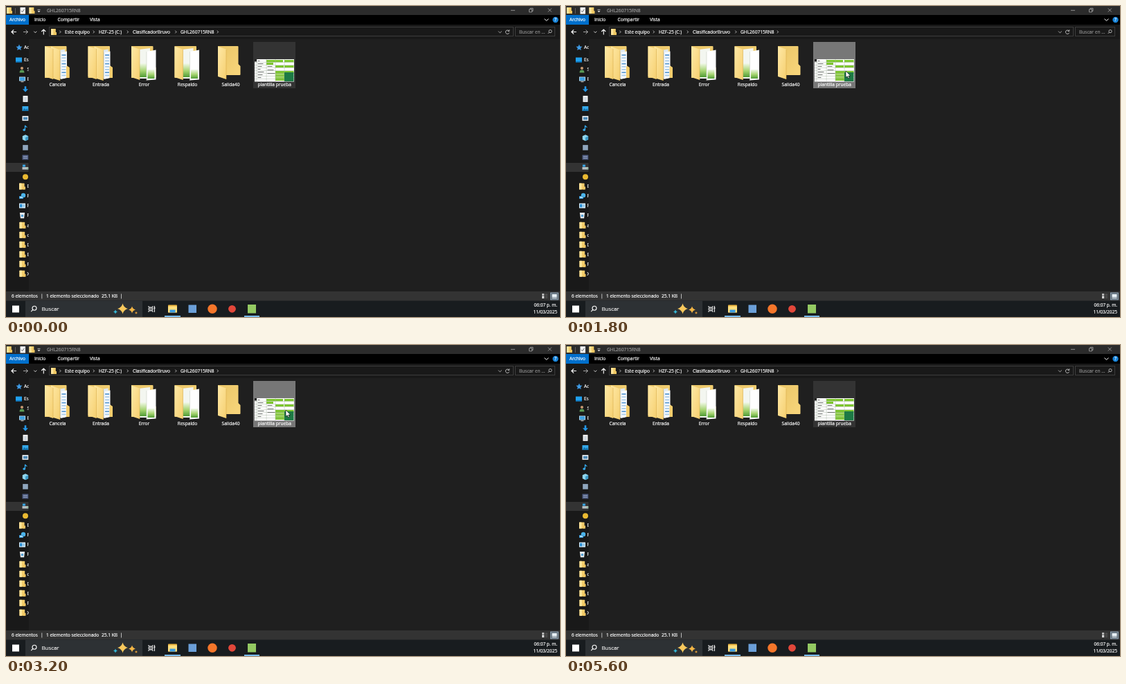
Write an HTML page that moves like this. It is 800 px wide and 450 px high and loops after 8000 ms.

```html
<!DOCTYPE html>
<html lang="es">
<head>
<meta charset="utf-8">
<title>Explorador</title>
<style>
html, body { margin: 0; width: 100%; height: 100%; overflow: hidden; background: #1f1f1f; }
svg { display: block; width: 100vw; height: 100vh; }
text { font: 6.6px "Open Sans", "Noto Sans", sans-serif; white-space: pre; stroke-width: .2; }
</style>
</head>
<body>
<svg id="stage" viewBox="0 0 800 450">
  <defs>
    <linearGradient id="flap" x2="1" y2="1"><stop stop-color="#ffe9a6"/><stop offset="1" stop-color="#f5cf70"/></linearGradient>
    <linearGradient id="back" y2="1"><stop stop-color="#eac566"/><stop offset="1" stop-color="#f8d67c"/></linearGradient>
    <linearGradient id="leaf" x2="0" y2="1"><stop stop-color="#f2f8ea"/><stop offset=".55" stop-color="#a5d46f"/><stop offset="1" stop-color="#4f9a35"/></linearGradient>
    <clipPath id="pane"><path d="M0 48H32.6V413H0z"/></clipPath>
  </defs>
</svg>
<script>
const LOOP = 8000, STEP = 200;
const NAME = "GHL260715RN8";
const stage = document.getElementById("stage");

const add = (parent, markup) => {
  const g = document.createElementNS("http://www.w3.org/2000/svg", "g");
  g.innerHTML = markup;
  return parent.appendChild(g);
};
const box = (x, y, w, h, fill, extra = "") =>
  `<rect x="${x}" y="${y}" width="${w}" height="${h}" fill="${fill}" ${extra}/>`;
const dot = (x, y, r, fill) => `<circle cx="${x}" cy="${y}" r="${r}" fill="${fill}"/>`;
const shape = (d, fill) => `<path d="${d}" fill="${fill}"/>`;
const line = (d, color, w = 1) => `<path d="${d}" fill="none" stroke="${color}" stroke-width="${w}"/>`;
// y is the middle of the line of text
const label = (x, y, s, fill = "#fff", anchor = "start", size = 6.6) =>
  `<text x="${x}" y="${y + size * 0.36}" fill="${fill}" stroke="${fill}" text-anchor="${anchor}" style="font-size:${size}px">${s}</text>`;
const lens = (x, y, r, color, w) =>
  `<circle cx="${x}" cy="${y}" r="${r}" fill="none" stroke="${color}" stroke-width="${w}"/>` +
  line(`M${x - r * .7} ${y + r * .7}l${-r * .9} ${r * .9}`, color, w);
const miniFolder = (x, y, w = 8, h = 9) =>
  box(x, y, w * .85, h, "#f3cd6b", 'rx=".5"') + box(x, y, w * .4, h, "#ffe59b", 'rx=".5"') +
  box(x + w * .62, y + h * .55, w * .38, h * .45, "#f0c661");
const page = (x, y) => box(x, y, 7, 9, "#f4f4f4") + line(`M${x + 1.5} ${y + 3}h4m-4 2h4m-4 2h4`, "#8ba5bd", .7);
const star = (x, y, r, fill) =>
  shape(`M${x} ${y - r}Q${x + r * .2} ${y - r * .2} ${x + r} ${y}Q${x + r * .2} ${y + r * .2} ${x} ${y + r}` +
        `Q${x - r * .2} ${y + r * .2} ${x - r} ${y}Q${x - r * .2} ${y - r * .2} ${x} ${y - r}z`, fill);

function topBars() {
  const tabs = [[41, "Inicio"], [74.5, "Compartir"], [121, "Vista"]];
  const crumbs = [[85, "Este equipo"], [134, "HZF-25 (C:)"], [183, "ClasificadorBruvo"], [252, NAME]];
  return box(0, 13, 800, 14, "#000") + box(0, 13, 33, 14, "#006fcb") + label(16.5, 20, "Archivo", "#fff", "middle") +
    tabs.map(([x, s]) => label(x, 20, s, "#fff")).join("") +
    line("M777.5 18.5l3 3 3-3", "#eee", 1) + dot(793.5, 20, 4.2, "#1683d8") + label(793.5, 20, "?", "#fff", "middle") +
    box(0, 27, 800, 21, "#191919") +
    line("M15 37.5H8m3.2-3.2L8 37.5l3.2 3.2", "#fff", 1.2) +
    line("M25 37.5h6.5m-3-3l3 3-3 3", "#a5a5a5", 1) +
    line("M40.3 36.7l2 2 2-2", "#ddd", 1) +
    line("M54.3 41.5V34m-3 3l3-3 3 3", "#fff", 1.1) +
    box(62.5, 30.5, 670, 13, "#191919", 'stroke="#3c3c3c"') +
    box(735.5, 30.5, 57, 13, "#191919", 'stroke="#3c3c3c"') +
    miniFolder(65, 33) +
    [78, 126.5, 175.5, 245, 305.5].map(x => line(`M${x - .7} 35.7l1.8 1.8-1.8 1.8`, "#d0d0d0", .9)).join("") +
    crumbs.map(([x, s]) => label(x, 37.5, s)).join("") +
    line("M711 36.5l2.4 2.4 2.4-2.4", "#bbb", .9) +
    line("M726.2 36a2.7 2.7 0 1 0 .5 2.6M726.8 34.3v2.2h-2.2", "#c8c8c8", .9) +
    label(741, 37.5, "Buscar en ...", "#8d8d8d") + lens(786, 36.6, 2.1, "#bdbdbd", .9) +
    miniFolder(1, 2) + line("M13.5 3v8", "#777", .7) +
    box(20.5, 2, 7.5, 9.5, "#f4f4f4") + line("M22 6.8l1.6 1.8 3-4", "#555", .9) +
    miniFolder(33.5, 2) + line("M45.5 5.3h4", "#ddd", .8) + shape("M45.5 7h4l-2 2.2z", "#ddd");
}

function navIcon(kind, x, y) {
  const blue = "#35a7e8";
  switch (kind) {
    case "star": return shape(`M${x} ${y - 4.5}l1.3 3 3.2.3-2.4 2.1.7 3.2-2.8-1.7-2.8 1.7.7-3.2-2.4-2.1 3.2-.3z`, "#3f9be6");
    case "desk": return box(x - 4.5, y - 3.5, 9, 7, "#1fa0ee") + box(x - 4.5, y + 2.3, 9, 1.2, "#0a66a8");
    case "user": return dot(x, y - 2, 2.1, "#c79a72") + shape(`M${x - 3.5} ${y + 4.5}a3.5 4 0 0 1 7 0z`, "#5b9a56");
    case "pc": return box(x - 4.5, y - 3.5, 9, 6, "#cfe9f8") + box(x - 3.8, y - 2.8, 7.6, 4.6, "#3d9ede") + box(x - 2, y + 3.2, 4, 1, "#ccc");
    case "down": return shape(`M${x - 1.3} ${y - 4}h2.6v4h2.7l-4 4.2-4-4.2h2.7z`, "#2497e8");
    case "doc": return page(x - 3.5, y - 4.5);
    case "pic": return box(x - 4.5, y - 3.5, 9, 7, blue) + shape(`M${x - 4.5} ${y + 3.5}l3-4 2 2 2-1.5 2 3.5z`, "#1272ad");
    case "film": return box(x - 4.5, y - 3.5, 9, 7, "#e8eef2") + box(x - 3, y - 1.8, 6, 3.8, "#4a87b5");
    case "note": return line(`M${x - .5} ${y + 2.5}V${y - 3.8}q1 2 3 2.6`, blue, 1.3) + dot(x - 1.8, y + 2.6, 1.8, blue);
    case "cube": return shape(`M${x} ${y - 4.5}l4.2 2v5l-4.2 2-4.2-2v-5z`, "#8fd6ef") + shape(`M${x} ${y - .5}l4.2-2v5l-4.2 2z`, "#3d9ac8");
    case "app": return box(x - 3.8, y - 3.8, 7.6, 7.6, "#8fa6bd");
    case "disk": return box(x - 4.5, y - 3.5, 9, 7, "#4d5b80") + line(`M${x - 3} ${y - 1.2}h6m-6 2.4h6`, "#a9b7cf", .9);
    case "drive": return box(x - 4.5, y, 9, 3.5, "#b9c0c4") + box(x - 4, y - 3.5, 4, 3, "#38a4e2") + dot(x + 3, y + 1.8, .7, "#4c5");
    case "cloud": return dot(x, y, 4, "#e9b931");
    case "net": return dot(x + 1.5, y - 1, 3.2, "#4ab4ea") + box(x - 4.5, y, 6, 4, "#2585c7") + box(x - 3.7, y + .7, 4.4, 2.4, "#a8dcf7");
    case "panel": return box(x - 4.5, y - 3.5, 9, 7, "#d9eefb") + box(x - 3.5, y - 2.3, 3.5, 4.6, "#2b8fd3") + line(`M${x + 1} ${y - 1}h2.5m-2.5 2h2.5`, "#2b8fd3", .9);
    case "bin": return shape(`M${x - 3.6} ${y - 4}h7.2l-1 8.3h-5.2z`, "#e3e9ec") + dot(x, y + .5, 1.7, "#4a9bd4");
    default: return miniFolder(x - 4, y - 4.5, 9);
  }
}

function sidePane() {
  const rows = [
    [60, "star", 19, "Acceso"], [78, "desk", 18.5, "Escritorio"], [92, "user", 23, "S"], [106, "pc", 23.5, "Este"],
    ..."down doc pic film note cube app disk drive cloud".split(" ").map((k, i) => [120.3 + i * 14.1, k, 28, ""]),
    [261, "folder", 23, "E"], [275, "net", 23.5, "Red"], [289, "panel", 23.5, "Panel"], [303, "bin", 23.5, "Papelera"],
    ..."acDEFX".split("").map((s, i) => [317.3 + i * 14, "folder", 23.5, s])
  ];
  return box(0, 48, 33, 365, "#191919") + `<g clip-path="url(#pane)">` + box(0, 227, 33, 13, "#333") +
    rows.map(([y, kind, x, s]) => navIcon(kind, x, y) + label(x < 20 ? 26 : 30.6, y, s, "#fff")).join("") + "</g>";
}

function folder(cx, name, kind) {
  const x = cx - 18.5;
  let inside = "", flaps;
  const flap = (left, width, drop, bottom) =>
    shape(`M${x + left} 58.5l${width} ${drop}V${bottom}l${-width} -4z`, "url(#flap)") +
    line(`M${x + left + width} ${59 + drop}V${bottom}`, "#d9ae4c", .6);
  if (kind === "docs") {
    inside = shape(`M${x + 20} 64l9-1.5V105h-9z`, "#dfe9f1") + shape(`M${x + 23} 67l9-1.5V104l-9 2z`, "#f8fbfd") +
      line(`M${x + 23} 67v39`, "#b9c6d1", .6) +
      Array.from({ length: 8 }, (_, i) => line(`M${x + 24.5} ${71 + i * 4.2}h6`, i % 3 ? "#a9cbe8" : "#5b9ad2", 1.8)).join("") +
      shape(`M${x + 31} 87l4.5 2v15h-4.5z`, "#f4cd6c");
    flaps = flap(9, 13, 5, 108) + flap(0, 12, 3, 106);
  } else if (kind === "art") {
    inside = shape(`M${x + 11} 63l16-2v44h-16z`, "#f3f6f0") + box(x + 12, 83, 12, 20, "url(#leaf)") +
      shape(`M${x + 22} 66l13.5-2.5v43l-13.5 1z`, "#fff") + line(`M${x + 22} 66v42`, "#c9cfc4", .6) + box(x + 23.5, 92, 10, 13, "url(#leaf)");
    flaps = flap(0, 12, 4, 107);
  } else {
    flaps = flap(0, 12, 4, 106);
  }
  const back = kind === "none"
    ? `M${x} 58h28.5q1 0 1 1v25l3 3v12q0 1-1 1H${x}z`
    : `M${x} 58h30.5q1 0 1 1v27l4 3v14q0 1-1 1H${x}z`;
  return shape(back, "url(#back)") + inside + flaps + label(cx, 113.5, name, "#fff", "middle");
}

function sheet() {
  const rows = Array.from({ length: 7 }, (_, i) => `M359 ${81.5 + i * 4}h57`).join("");
  const cols = [362, 376, 389, 402].map(x => `M${x} 77v32`).join("");
  const bars = [[376, 78, 24, 3.4], [402, 78, 13.5, 3.4], [389, 86, 12, 3], [402, 86, 13.5, 3], [376, 82, 10, 3], [389, 94, 13, 14], [402, 94, 13.5, 3]];
  const words = Array.from({ length: 7 }, (_, i) => `M363.5 ${79.5 + i * 4}h${3 + i * 5 % 7}`).join("") +
    Array.from({ length: 3 }, (_, i) => `M377.5 ${87.5 + i * 5}h${7 + i * 2}`).join("");
  return box(359, 77, 57, 32.5, "#fff") + bars.map(b => box(...b, "#7cc52e")).join("") +
    line(rows + cols, "#a9b5a3", .45) + line(words, "#4c524c", .8) + line("M389.5 99h12m-12 4h12", "#c4e59f", 1) +
    box(359, 77, 3, 3.5, "#222") + box(402, 96, 13.5, 13, "#1d7a45");
}

function bottomBars() {
  return box(0, 413, 800, 14, "#333") + label(8, 420, "6 elementos", "#fff") + label(58, 420, "1 elemento seleccionado", "#fff") +
    label(138, 420, "25.1 KB", "#fff") + line("M51.8 416.5v7M166.5 416.5v7", "#ddd", .8) +
    line("M774 417.3h3.2m-3.2 2.4h3.2m-3.2 2.4h3.2", "#fff", 1.6) + line("M778.5 417.3h3.5m-3.5 2.4h3.5m-3.5 2.4h3.5", "#777", .7) +
    box(786.5, 415, 11, 10, "#5f6b75", 'stroke="#a9c3d9" stroke-width=".7"') + box(788.5, 417, 7, 4.5, "#e8f1f8") + box(788.5, 422.3, 7, 1, "#e8f1f8") +
    box(0, 426.5, 800, 23.5, "#181c1f") + box(28, 426.5, 169, 23.5, "#2d3134") +
    box(9, 433.5, 10, 10, "#fff") + lens(41, 437.3, 3, "#fff", 1.1) + label(51.5, 438.5, "Buscar", "#eee", "start", 7.9) +
    star(168.5, 438, 7.5, "#f7c85c") + star(182, 439.5, 5, "#f3b646") + star(158, 442.5, 3, "#35b6d6") + star(188, 444, 2, "#e9a13a") +
    line("M206 434v2h6v-2M206 443v-2h6v2M206 437.3h6v2.4h-6zM214.5 434v9", "#eee", 1) + dot(214.5, 437, 1.1, "#fff");
}

function taskIcons() {
  return box(234, 432.5, 13, 11, "#e9b33f", 'rx=".8"') + box(234, 434.5, 13, 9, "#ffdf7d", 'rx=".6"') + box(236.5, 439.5, 8, 4, "#3a9be0") +
    box(229, 448, 23, 2, "#76b9ed") + box(344, 448, 22, 2, "#76b9ed") +
    box(263.5, 432.5, 11.5, 11.5, "#6b9fd8") + dot(298, 438.3, 6.7, "#f5762a") + dot(326.5, 438.3, 5.4, "#e2473a") +
    box(349, 432, 12, 12.5, "#93c962") +
    label(796, 433, "06:07 p. m.", "#fff", "end", 6.5) + label(796, 443, "11/03/2025", "#fff", "end", 6.5);
}

add(stage, box(0, 0, 800, 450, "#1f1f1f"));
const title = add(stage, box(0, 0, 800, 13, "currentColor"));
add(stage, topBars());
const caption = add(stage, label(59, 7, NAME, "currentColor") +
  line("M729 6.3h6M782.8 3.5l5 5m0-5l-5 5M755.5 4.8h4v4h-4zM757 4.6v-1.3h4v4h-1.3", "currentColor", .9));
add(stage, sidePane());
const hover = add(stage, box(168.5, 51.5, 61.5, 68, "#4d4d4d"));
const chosen = add(stage, box(357, 52, 61, 67, "currentColor"));
add(stage, [["Cancela", "docs"], ["Entrada", "docs"], ["Error", "art"], ["Respaldo", "art"], ["Salida40", "none"]]
  .map(([s, kind], i) => folder(74.5 + i * 62.5, s, kind)).join("") + sheet() + label(387.7, 113.5, "plantilla prueba", "#fff", "middle"));
add(stage, bottomBars());
const button = add(stage, box(229, 427, 23, 21, "#4d5255"));
add(stage, taskIcons());
const cursor = add(stage, `<path d="M0 0V9.6L2.2 7.6 3.7 11 5.2 10.3 3.8 7.1H6.8z" fill="#fff" stroke="#000" stroke-width=".6"/>`);

// pointer path: time, x, y
const path = [
  [800, 636, 22], [1000, 566, 56], [1200, 478, 84], [1400, 434, 87], [1600, 424, 89], [1800, 404, 94],
  [4000, 404, 94], [4200, 416, 97], [4400, 409, 102], [4600, 406, 100], [4800, 200.5, 76], [5000, 140, 33], [5200, 48, 7]
];
function pointAt(t) {
  const i = path.findIndex(p => p[0] >= t);
  if (i <= 0) return path[0].slice(1);
  const [a, b] = [path[i - 1], path[i]];
  const k = (t - a[0]) / (b[0] - a[0]);
  return [a[1] + (b[1] - a[1]) * k, a[2] + (b[2] - a[2]) * k];
}
const show = (el, on) => { el.style.opacity = on ? 1 : 0; };

function draw(now) {
  const t = Math.floor(now % LOOP / STEP) * STEP;   // the screen refreshes five times a second
  const within = (from, to) => t >= from && t < to;
  const active = within(2000, 3200);
  title.style.color = active ? "#000" : "#2b2b2b";
  caption.style.color = active ? "#fff" : "#9a9a9a";
  chosen.style.color = within(1800, 4800) ? "#777" : "#333";
  show(button, active);
  show(hover, within(4800, 5000));
  const visible = within(800, 5400);
  show(cursor, visible);
  if (visible) cursor.setAttribute("transform", `translate(${pointAt(t)})`);
}

const start = performance.now();
function tick() {
  draw(performance.now() - start);
  requestAnimationFrame(tick);
}
tick();
</script>
</body>
</html>
```
